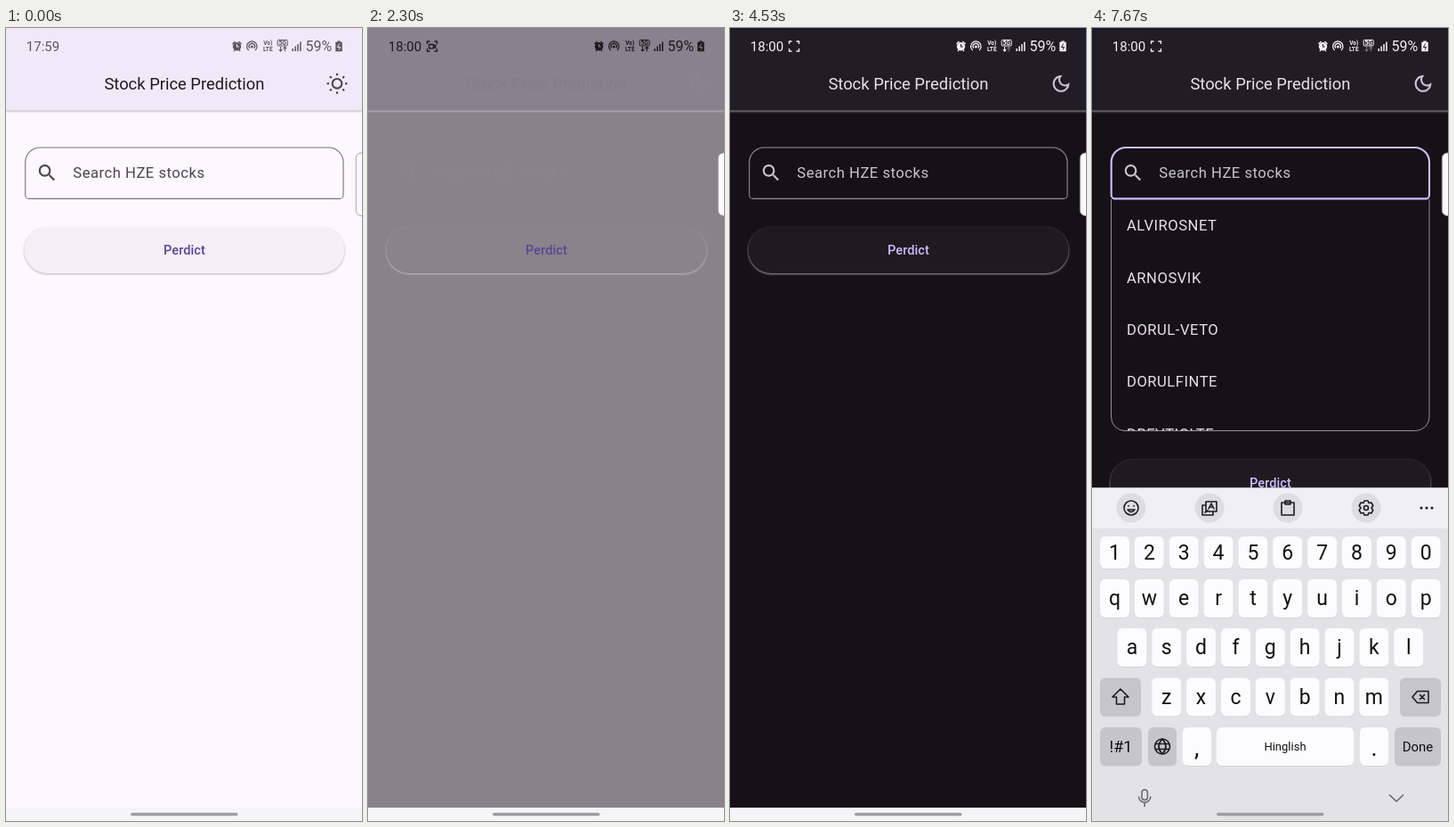
Animation of 400x889 px, one loop 8000 ms. Source, as an HTML page:

```html
<!DOCTYPE html>
<html lang="en">
<head>
<meta charset="utf-8">
<title>Stock Price Prediction</title>
<style>
html, body { margin: 0; width: 100%; height: 100%; overflow: hidden; }
svg { display: block; width: 400px; height: 889px; background: var(--bg); font-family: Roboto, sans-serif; }
.mid { text-anchor: middle; }
.body { font-size: 16.6px; letter-spacing: .52px; }
.status { fill: var(--status); }
.statusLine { fill: none; stroke: var(--status); stroke-width: 1.3; }
.icon { fill: var(--icon); }
.raised { filter: drop-shadow(0 1.5px 1.3px var(--shadow)); }
.line { fill: none; stroke: #1d1c20; stroke-width: 1.6; stroke-linecap: round; stroke-linejoin: round; }
</style>
</head>
<body>
<svg id="stage" viewBox="0 0 400 889">
  <g class="raised"><rect x="-10" width="420" height="92.5" style="fill:var(--bar)"/></g>

  <g class="status">
    <text id="clock" x="22.8" y="26" font-size="15"></text>
    <text x="336.5" y="26" font-size="16">59%</text>
    <g font-size="6.6" font-weight="700" class="mid">
      <text x="294.3" y="19">Vo)</text><text x="294.3" y="26.3">LTE</text>
    </g>
    <circle cx="259.5" cy="20.7" r="4.7"/>
    <path d="M254.5 18l3-3M264.5 18l-3-3M256 26l1.5-2M263 26l-1.5-2" class="statusLine"/>
    <path d="M259.5 18v3h2.3" fill="none" stroke="var(--bar)" stroke-width="1.1"/>
    <g class="statusLine">
      <path d="M272.6 25a5.7 5.7 0 1 1 7.4 0M273.8 22.6a3.2 3.2 0 1 1 5 0"/>
      <rect x="305.2" y="13.4" width="11" height="6.6" rx="1" stroke-width="1"/>
      <path id="down" d="M308.6 21v5m-1.8-1.8l1.8 1.8 1.8-1.8" stroke-width="1.1"/>
      <path id="up" d="M313.3 26.2v-5m-1.8 1.8l1.8-1.8 1.8 1.8" stroke-width="1.1"/>
      <path d="M322.2 26v-3M325.1 26v-5.5M328 26v-8M330.9 26v-10.6" stroke-width="1.5"/>
    </g>
    <circle cx="276.3" cy="21" r="1.5"/>
    <text x="310.7" y="19" font-size="6.8" font-weight="700" class="mid">5G</text>
    <path d="M372.3 14.5h3.4v1.3h2v10.4h-7.4V15.800h2z"/>
    <path d="M374.800 17.500l-2.500 4h3.200l-1.600 3" fill="none" stroke="var(--bar)" stroke-width="1"/>
  </g>
  <g id="recorder" class="statusLine" stroke-width="1.1">
    <path d="M69.500 15H66.500v3M74.500 15h3v3M66.500 23v3h3M77.500 23v3h-3"/>
    <path id="camera" d="M68.600 18.500h4.800v4.300h-4.800zM73.800 20.200l2-1.200v3.400l-2-1.200"/>
  </g>

  <text x="200.4" y="68.7" font-size="18.4" class="mid" style="fill:var(--title)">Stock Price Prediction</text>
  <g id="sun" transform="translate(372 62.300)" fill="none" stroke="var(--icon)" stroke-width="2.1">
    <circle r="5.3"/><g id="rays"></g>
  </g>
  <path id="moon" class="icon" transform="translate(359.500 50) scale(1.04)" d="M9.37 5.510C9.190 6.150 9.100 6.820 9.100 7.500c0 4.080 3.320 7.400 7.400 7.400.680 0 1.350-.090 1.990-.270C17.450 17.190 14.930 19 12 19c-3.860 0-7-3.140-7-7 0-2.930 1.810-5.450 4.370-6.490zM12 3c-4.970 0-9 4.030-9 9s4.030 9 9 9 9-4.030 9-9c0-.460-.040-.920-.100-1.360-.980 1.370-2.580 2.260-4.400 2.260-2.980 0-5.400-2.420-5.400-5.400 0-1.810.890-3.420 2.260-4.400C12.920 3.040 12.460 3 12 3z"/>

  <path class="icon" transform="translate(33.700 150) scale(1.04)" d="M15.500 14h-.790l-.280-.270C15.410 12.590 16 11.110 16 9.500 16 5.910 13.090 3 9.500 3S3 5.910 3 9.500 5.910 16 9.500 16c1.610 0 3.090-.590 4.230-1.570l.270.280v.790l5 4.990L20.490 19l-4.990-5zm-6 0C7.010 14 5 11.990 5 9.500S7.010 5 9.500 5 14 7.010 14 9.500 11.990 14 9.500 14z"/>
  <text x="75.300" y="168" class="body icon">Search HZE stocks</text>
  <rect id="cursor" x="75.700" y="150" width="2" height="25.500" fill="#cfbcff"/>

  <g id="menu">
    <path d="M21.500 192V436a15.500 15.500 0 0 0 15.500 15.500H363.500a15.500 15.500 0 0 0 15.500-15.500V192" fill="none" stroke="#938f99"/>
    <clipPath id="menuClip"><rect x="22" y="193" width="357" height="258.500"/></clipPath>
    <g id="items" class="body" fill="#e6e0e9" clip-path="url(#menuClip)"></g>
  </g>
  <path id="field" fill="none" d="M21.700 150.500a16.500 16.500 0 0 1 16.500-16.500H362.500a16.500 16.500 0 0 1 16.500 16.500V187.200a4.200 4.200 0 0 1-4.200 4.200H25.900a4.200 4.200 0 0 1-4.200-4.200z"/>

  <g id="button">
    <g class="raised"><rect x="20.500" y="223" width="360" height="52" rx="26" style="fill:var(--button)"/></g>
    <text x="200.500" y="254.200" font-size="14.500" font-weight="500" letter-spacing=".1" class="mid" style="fill:var(--label)">Perdict</text>
  </g>

  <rect x="393.300" y="140" width="16" height="70.500" rx="6" fill="#fdf9fd" stroke="#929096" stroke-opacity=".8"/>
  <rect y="874" width="400" height="15" fill="#f5f4f7"/>
  <g id="keyboard"></g>
  <g id="keyboardNav" fill="none" stroke="#66656a" stroke-width="1.500">
    <rect x="56" y="854" width="6.400" height="11.500" rx="3.200"/>
    <path d="M52.500 861.500a6.700 6.700 0 0 0 13.400 0M59.200 868.500v4.500M334 859.500l8 7.500 8-7.500"/>
  </g>
  <rect x="140" y="879.700" width="120.500" height="3.600" rx="1.800" fill="#9f9ca3"/>
</svg>
<script>
const LOOP = 8000;
const $ = id => document.getElementById(id);
const clamp = x => Math.min(1, Math.max(0, x));
const ramp = (t, from, to) => clamp((t - from) / (to - from));
const mix = (a, b, u) => `rgb(${a.map((v, i) => Math.round(v + (b[i] - v) * u))})`;
const show = (id, on) => $(id).style.display = on ? '' : 'none';

// Light and dark colour of each themed part
const THEME = {
  bg: [[253, 247, 254], [21, 17, 22]],
  bar: [[240, 234, 248], [32, 29, 38]],
  button: [[245, 239, 249], [30, 27, 32]],
  title: [[29, 27, 32], [230, 224, 233]],
  icon: [[73, 69, 79], [202, 196, 208]]
};
const OUTLINE = [[121, 116, 126], [147, 143, 153]];
const LABEL = [[88, 70, 150], [207, 188, 255]];
const ACCENT = [207, 188, 255];

// Times at which the recorder's camera and the text cursor toggle
const CAMERA = [100, 600, 1070, 1570, 2070, 2570, 3070, 3530, 4030, 4530, 4970, 5430, 6000, 6500, 7000, 7500];
const CURSOR = [5430, 5730, 6170, 6670, 7170, 7670];
const toggled = (times, t) => times.filter(x => x <= t).length % 2 === 1;

function buildStatic() {
  $('rays').innerHTML = [...Array(8)].map((_, i) =>
    `<path d="M0-${i % 2 ? 8.800 : 9}v-2.500" transform="rotate(${i * 45})"/>`).join('');
  $('items').innerHTML = ['ALVIROSNET', 'ARNOSVIK', 'DORUL-VETO', 'DORULFINTE', 'DREVTIOLTE'].map((name, i) =>
    `<text x="39" y="${227.300 + i * 58.300}">${name}</text>`).join('');
}

function buildKeyboard() {
  const PITCH = 38.850, LIGHT = '#fcfbfe', GREY = '#c6c5ca';
  const key = (x, y, w, h, label = '', size = 22, fill = LIGHT, base = 29) =>
    `<rect x="${x}" y="${y + .8}" width="${w}" height="${h}" rx="6" fill="#cfced4"/>
     <rect x="${x}" y="${y}" width="${w}" height="${h}" rx="6" fill="${fill}"/>
     <text class="mid" x="${x + w / 2}" y="${y + base}" font-size="${size}" fill="#111">${label}</text>`;
  const row = (chars, x, y, h = 43, base = 29) =>
    [...chars].map((c, i) => key(x + i * PITCH, y, 33, h, c, 23, LIGHT, base)).join('');
  const icon = (x, y, d) => `<path class="line" transform="translate(${x} ${y})" d="${d}"/>`;
  const tools = [
    'M-8 0a8 8 0 1 0 16 0a8 8 0 1 0-16 0M-3-2.500v.5M3-2.500v.5M-4 2q4 5 8 0z',
    'M-4-7H8V4H-4zM-4-3H-8V8H4V4M-1 1l3-6 3 6M0-1h4M-5 5l3-2',
    'M-7-6H7V8H-7zM-3-8H3V-4H-3z',
    'M-2-8h4l1 2.500 2.800-.5 2 3.500-1.800 2.500 1.800 2.500-2 3.500-2.800-.5-1 2.500h-4l-1-2.500-2.800.5-2-3.500 1.800-2.500-1.800-2.500 2-3.500 2.800.5zM-2.500 0a2.500 2.500 0 1 0 5 0a2.500 2.500 0 1 0-5 0'
  ];
  $('keyboard').innerHTML =
    '<rect y="515.500" width="400" height="374" fill="#e3e2e7"/><rect y="515.500" width="400" height="45.500" fill="#f0eff3"/>' +
    tools.map((d, i) => `<circle cx="${44 + i * 88}" cy="538" r="16.500" fill="#dddce1"/>` + icon(44 + i * 88, 538, d)).join('') +
    [370, 376, 382].map(x => `<circle cx="${x}" cy="538" r="1.600" fill="#222"/>`).join('') +
    row('1234567890', 9, 570, 36, 26) + row('qwertyuiop', 9, 618) +
    row('asdfghjkl', 28.400, 673) + row('zxcvbnm', 67.200, 728.500) +
    key(9, 728.500, 46, 43, '', 0, GREY) + key(346, 728.500, 46, 43, '', 0, GREY) +
    icon(32, 750, 'M0-9L9 0H4.500V8H-4.500V0H-9z') +
    icon(369, 750, 'M-9 0L-3.500-6.500H9V6.500H-3.500zM-.5-2.500l5 5M4.500-2.500l-5 5') +
    key(9, 784, 47, 43, '!#1', 18, GREY, 28) + key(63, 784, 32, 43, '', 0, GREY) +
    icon(79, 805.500, 'M-8.500 0a8.500 8.500 0 1 0 17 0a8.500 8.500 0 1 0-17 0M-8-3H8M-8 3H8M0-8.500q-8 8.500 0 17q8-8.500 0-17') +
    key(101.500, 784, 32.500, 43, ',', 27, LIGHT, 32) + key(140, 784, 154, 43, 'Hinglish', 13, LIGHT, 26) +
    key(301, 784, 32, 43, '.', 27, LIGHT, 32) + key(340, 784, 52, 43, 'Done', 15, GREY, 27);
}

function render(t) {
  const style = $('stage').style;
  const dark = ramp(t, 2200, 2400);
  for (const name in THEME) style.setProperty('--' + name, mix(...THEME[name], dark));
  const shade = Math.round(255 * clamp(dark * 2));
  style.setProperty('--shadow', `rgba(${shade},${shade},${shade},${.270 + .330 * dark})`);
  style.setProperty('--label', mix(...LABEL, ramp(t, 2300, 2530)));
  style.setProperty('--status', t < 2300 ? '#5b5762' : t < 2390 ? '#1c1a1f' : '#f4f1f6');

  const newMinute = t >= 1000;
  $('clock').textContent = newMinute ? '18:00' : '17:59';
  $('recorder').setAttribute('transform', `translate(${newMinute ? 0 : -1.500} 0)`);
  show('recorder', t >= 100);
  show('camera', toggled(CAMERA, t));
  $('up').style.opacity = t < 4100 ? 1 : .4;
  $('down').style.opacity = t < 5430 ? 1 : .4;

  show('sun', t < 2170);
  show('moon', t >= 2170);

  const open = t >= 5430, focus = ramp(t, 5430, 5600);
  $('field').style.stroke = open ? mix(OUTLINE[1], ACCENT, focus) : mix(...OUTLINE, dark);
  $('field').style.strokeWidth = 1.100 + focus;
  show('menu', open);
  show('cursor', toggled(CURSOR, t));
  $('button').setAttribute('transform', `translate(0 ${open ? 260.500 : 0})`);

  const u = ramp(t, 5640, 5830), slide = u * u * (3 - 2 * u);
  show('keyboard', u > 0);
  show('keyboardNav', u > 0);
  $('keyboard').setAttribute('transform', `translate(0 ${374 * (1 - slide)})`);
}

function tick() {
  render(performance.now() % LOOP);
  requestAnimationFrame(tick);
}

buildStatic();
buildKeyboard();
tick();
</script>
</body>
</html>
```
